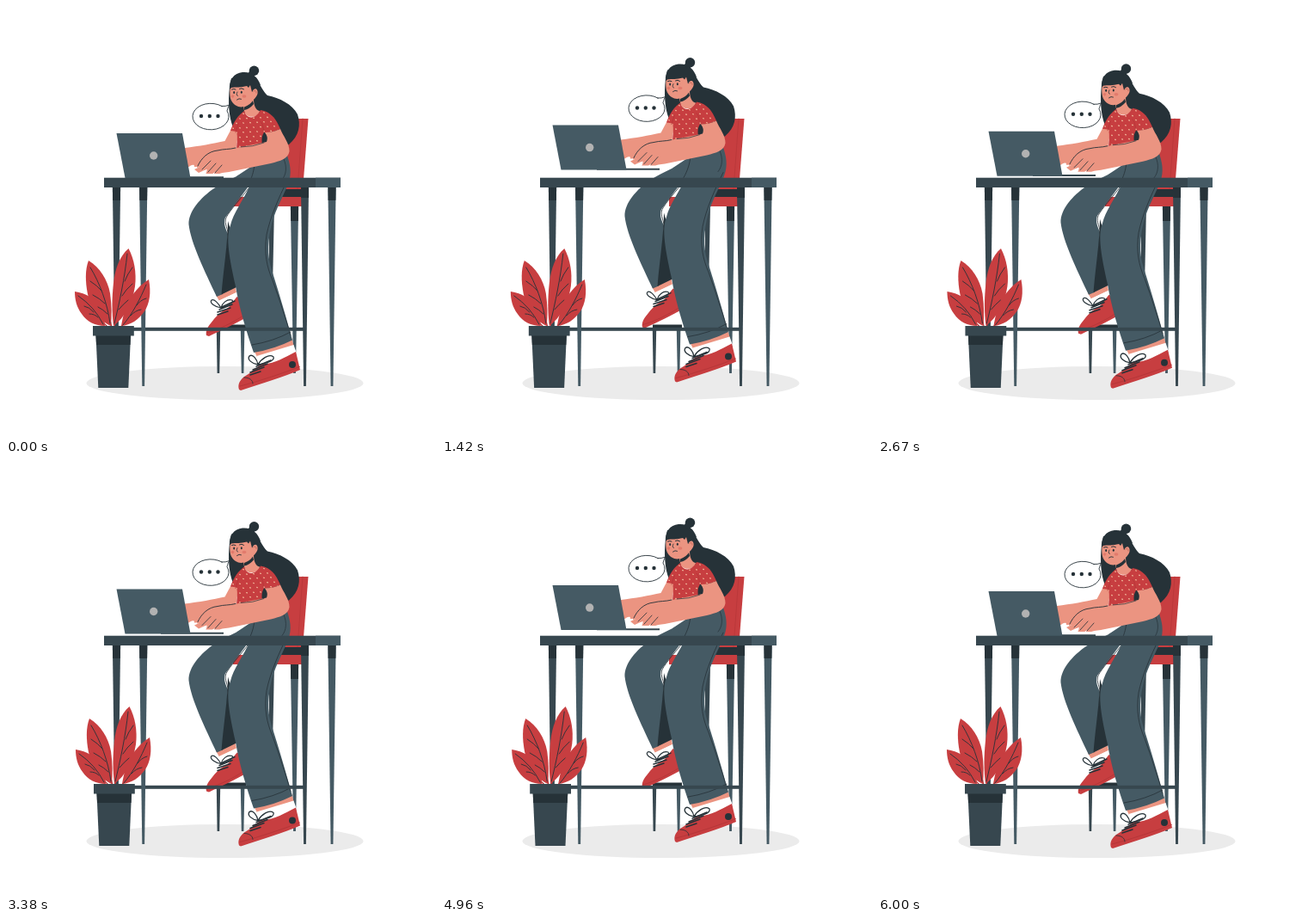
These frames come from a looping animation (500 px wide and 500 px high, 6040 ms). An HTML page with a canvas:

```html
<!DOCTYPE html>
<html lang="en">
<head>
<meta charset="utf-8">
<title>At the desk</title>
<style>
html, body { margin: 0; width: 100%; height: 100%; overflow: hidden; background: #fff; }
canvas { display: block; width: 500px; height: 500px; }
</style>
</head>
<body>
<canvas id="stage"></canvas>
<script>
const canvas = document.getElementById('stage');
const ctx = canvas.getContext('2d');
const ratio = window.devicePixelRatio || 1;
canvas.width = canvas.height = 500 * ratio;

const RED = '#c73e40', DEEP = '#b23437', SKIN = '#eb9481', INK = '#263238';
const SLATE = '#455a64', DARK = '#37474f', WHITE = '#fff';
const LOOP = 6040, FPS = 24;

const cache = {};
const path = d => cache[d] || (cache[d] = new Path2D(d));

function fill(color, d) {
  ctx.fillStyle = color;
  ctx.fill(path(d));
}

function line(d, width = 0.8, color = INK) {
  ctx.strokeStyle = color;
  ctx.lineWidth = width;
  ctx.stroke(path(d));
}

function dot(x, y, rx, color, ry = rx, turn = 0) {
  ctx.fillStyle = color;
  ctx.beginPath();
  ctx.ellipse(x, y, rx, ry, turn, 0, Math.PI * 2);
  ctx.fill();
}

function box(x, y, w, h, color) {
  ctx.fillStyle = color;
  ctx.fillRect(x, y, w, h);
}

// Tapered furniture leg with a dark cap
function leg(x, top, bottom, color, cap = 15) {
  const half = y => 4.6 - 3.2 * (y - top) / (bottom - top);
  const part = (a, b, c) => {
    ctx.fillStyle = c;
    ctx.beginPath();
    ctx.moveTo(x - half(a), a);
    ctx.lineTo(x + half(a), a);
    ctx.lineTo(x + half(b), b);
    ctx.lineTo(x - half(b), b);
    ctx.fill();
  };
  part(top, bottom, color);
  part(top, top + cap, INK);
}

function chair() {
  fill(RED, 'M318 131H351.5L345 214H318Z');
  line('M345 131L339 213', 0.6, DEEP);
  fill(DARK, 'M306 233H312L309 372H306Z');
  leg(335.5, 233, 427, SLATE, 17);
  box(245, 370.5, 34, 5.5, INK);
  fill(DARK, 'M244.8 376H249.2L248.2 427H245.6Z');
  fill(SLATE, 'M272.8 376H277.4L276.4 427H273.8Z');
  fill(RED, 'M264 222H344V233H264Z');
  fill(INK, 'M306 213H352V222H306Z');
}

function backFrame() {
  leg(128.5, 211, 442, DARK);
  leg(347.5, 205, 442, DARK, 18);
}

function tableTop() {
  box(148, 373.8, 198, 4, DARK);
  leg(159.7, 211, 442, SLATE);
  leg(379, 211, 442, SLATE);
  box(114, 199.7, 275, 11.3, DARK);
  box(360, 199.7, 29, 11.3, SLATE);
}

function shoes() {
  // far foot
  fill(SKIN, 'M244 336L266 325L268 333L248 343Z');
  fill(WHITE, 'M247.5 342.5L268 333L272 345L252 358Z');
  fill(RED, 'M233 383C232 378 234 374 238 369C244 361 249 356 255 353C261 350 265 342 268.5 338L282 345L284 360C265 370 251 377 236 384Z');
  line('M233.5 380C248 376 264 368 276 360', 0.8, DEEP);
  line('M246 356L261 351M248 353L263 347M251 350L266 343M246 359L258 355', 1.5);
  line('M250 351C243 350 236 345 239 342C242 340 247 346 250 351C251 346 257 340 263 342C266 345 256 350 250 351', 1.2);
  // near foot
  fill(SKIN, 'M288 400L332 386L334.5 394.5L292 408Z');
  fill(WHITE, 'M291.5 407L334.5 394L338 404L302 420Z');
  fill(RED, 'M271 446C269 440 272 435 277 431C286 426 292 419 298 416C311 417 323 409 337 402L342 423C324 431 297 439 273 447Z');
  line('M272 442C295 436 322 427 341.5 419.5', 0.8, DEEP);
  line('M277 432C283 432 287 435 287 439', 0.8, INK);
  line('M284 426L300 420M287 423L304 416M291 419L308 412M284 429L296 425', 1.5);
  line('M293 417C286 416 280 411 283 407C287 404 292 411 293 417C297 410 306 404 311 408C313 413 301 416 293 417', 1.3);
  dot(333, 417, 4, INK);
}

function pants() {
  fill(SLATE, 'M290 185C274 197 257 202 242 212C226 223 212 239 212.5 254C215 276 231 308 245 338L252 335C254 310 257 285 258 265C254 257 253 251 255 246L281 211L318 196Z');
  fill(INK, 'M258 250C258 275 253 305 250.5 335.5L270 326L264 270Z');
  line('M282 212C273 224 260 238 256 246C253 254 259 258 258.5 270');
  fill(SLATE, 'M268 198L289 184L327 174C330 183 333 194 328 207C324 218 314 235 309 253C305 270 303 289 309 307C317 332 326 363 333 388.5Q312 399 288 403C280 380 271 351 267 326C260 294 255 269 261 255C264 241 276 226 284 208Z');
  line('M327 203C317 223 307 246 303 266C300 287 303 303 310 319C318 342 325 362 331 383', 0.8);
  line('M286 394Q311 390 331 379', 0.8);
  line('M289 184C288 193 286 200 281 209', 0.8);
  line('M323 178C327 187 326 196 321 202', 0.7);
}

const SHIRT = 'M277 122C280 132 290 132 296 121C308 123 314 131 319 143Q309 148 300 147C296 153 298 158 298 166L268 169C268 160 270 153 268 146L261 145C265 134 270 127 277 122Z';

function torso() {
  // far arm
  fill(SKIN, 'M263 141L254.5 157C241 160 224 163 208 165V187L221 187L246 179L267 169L270 148Z');
  fill(SKIN, 'M276 116L288 108C288 115 290 121 295 122C294 130 279 132 277 122Z');
  fill(RED, SHIRT);
  ctx.save();
  ctx.clip(path(SHIRT));
  for (let row = 0; row < 9; row++) {
    for (let col = 0; col < 8; col++) {
      dot(260 + col * 8 + row % 2 * 4, 126 + row * 5.4 - col * 0.4, 0.95, '#f5c6a5', 0.7, 0.5);
    }
  }
  ctx.restore();
  line('M299 146C300 140 298 137 296 134', 0.7, DEEP);
  line('M267 147L270 137', 0.7, DEEP);
}

function nearArm() {
  fill(SKIN, 'M301 147Q311 147 319 143C322 151 330 160 329.5 169C328 178 319 180 308 183L264 192C257 194 253 193 248 195L231 195L234 190L224 192L227 187L222 188C222 184 227 179 232 174C237 169 243 167 250 167L263 166L303 158C305 153 303 150 301 147Z');
  fill(WHITE, 'M212 188C215 184 219 184 219 186C219 189 215 191 211 192Z');
  fill(SKIN, 'M219 190L232 184L237 188L224 194Z');
  line('M223 186C227 177 235 169 246 168C254 166 259 167 267 165', 0.9);
  line('M228 190L238 180M235 193L244 183M243 194L251 185', 0.8);
  line('M300 159Q287 164 273 164', 0.7);
  fill(WHITE, 'M229 195L234 191L232 196ZM239 196L243 193L241 197Z');
}

function head() {
  // hair behind the face
  fill(INK, 'M260 94C258 112 259 128 264 141C270 134 276 126 281 120L291 110L285 84L262 84Z');
  torso();
  fill(SKIN, 'M261 91C260 99 260 106 262 110C267 119 277 120 285 112C288 108 291 107 292.5 102C293.5 96 289 95 287 98L286 87L264 86Z');
  fill(INK, 'M277 117.5Q284 115 287 110L288 114Q283 120 277 121Z');
  fill(INK, 'M260 97C259 86 265 78 275 77C286 76 293 83 296 92C293 93 292 95 290 96C287 96 287 100 286 100L284 92L282 95L280 93C273 95 267 94 262 95Z');
  dot(288.5, 75.2, 5.7, INK);
  fill(INK, 'M281 79L285 73L291 79L287 83Z');
  line('M288 99Q291 97 291 101', 0.7, '#b85c50');
  // face
  dot(265.2, 100.5, 1, INK, 1.5);
  dot(273.8, 100.2, 1, INK, 1.5);
  line('M262.5 97Q265 95.8 267 97M271.5 96.3Q274 94.8 276.5 96.8', 1);
  line('M269 100Q267 104 269.5 104.5', 0.8);
  line('M268.5 109Q271 106.8 273.5 108.2', 0.9);
  dot(277, 105, 2.4, 'rgba(214,92,82,.45)', 1.8);
  dot(263.5, 105, 1.8, 'rgba(214,92,82,.45)');
}

function woman() {
  shoes();
  pants();
  fill(INK, 'M280 79C294 82 296 97 304 104C318 107 333 114 339 126C343 138 341 151 329 161L296 166L292 122L284 112Z');
  head();
  nearArm();
}

function laptop() {
  fill(DARK, 'M180 198.2H253V200.3H180Z');
  fill(SLATE, 'M128.5 148H205L214.5 200H138.5Z');
  dot(171.7, 174, 4.7, '#b2b2b2');
}

function bubble() {
  const d = 'M251 116.5A21 15.3 0 1 0 257 122C258 119 258 117 260 115Q255 117 251 116.5Z';
  fill(WHITE, d);
  line(d, 0.9);
  for (const x of [227, 236.8, 246.5]) dot(x, 128, 2.2, INK);
}

function plant() {
  line('M112 367L119 374M120 360L123 374M128 360L126 374M139 366L133 374', 1.2, DEEP);
  fill(RED, 'M80 332C93 334 104 340 109 351C113 359 115 366 115 372C104 372 94 367 88 358C82 350 80 341 80 332Z');
  fill(RED, 'M96 296C109 304 118 318 121 334C123 348 123 360 122 372C110 367 99 352 95 335C92 320 92 306 96 296Z');
  fill(RED, 'M142.5 282C149 294 152 310 150 326C147 346 138 362 125 372C123 356 123 340 125 322C127 305 132 291 142.5 282Z');
  fill(RED, 'M166 318C169 333 167 346 161 355C154 365 145 371 134 372C136 359 140 346 147 336C153 328 159 322 166 318Z');
  line('M84 337Q103 350 113 370M91 349Q97 350 102 356M97 358Q103 358 107 362', 0.9);
  line('M98 304C109 322 118 346 121 369M98 320Q106 325 111 331M101 336Q109 340 115 346M107 350Q113 353 118 358', 0.9);
  line('M141 288C138 316 132 345 126 369M147 304Q141 312 138 320M147 323Q139 330 135 337M142 342Q136 347 131 353', 0.9);
  line('M163 324C156 341 147 358 136 371M163 340Q156 342 152 348M157 353Q150 354 145 360', 0.9);
  fill(DARK, 'M104.5 383H145L142.3 444H107.3Z');
  fill(INK, 'M104.5 383H145L144.5 394H105Z');
  box(101, 372, 47.8, 11.5, DARK);
}

// Linear interpolation over evenly spaced keys
const SHAKE = [0, -1, 2, -4, 4, -4, 4, -4, 2, -1, 0];
function shake(sec) {
  const u = sec % 6 / 0.6, i = Math.floor(u);
  return SHAKE[i] + (SHAKE[i + 1] - SHAKE[i]) * (u - i);
}

const lift = sec => -10 * (1 - Math.abs(sec % 3 / 1.5 - 1));

function shifted(dx, dy, ...parts) {
  ctx.save();
  ctx.translate(dx, dy);
  parts.forEach(part => part());
  ctx.restore();
}

function draw(now) {
  const sec = Math.floor((now % LOOP + 5) * FPS / 1000) / FPS;
  ctx.setTransform(ratio, 0, 0, ratio, 0, 0);
  ctx.lineCap = ctx.lineJoin = 'round';
  box(0, 0, 500, 500, WHITE);
  dot(254.5, 438.5, 161, '#ebebeb', 19.5);
  chair();
  backFrame();
  shifted(0, lift(sec), bubble, woman, laptop);
  tableTop();
  shifted(shake(sec), 0, plant);
}

function tick() {
  draw(performance.now());
  requestAnimationFrame(tick);
}
tick();
</script>
</body>
</html>
```
